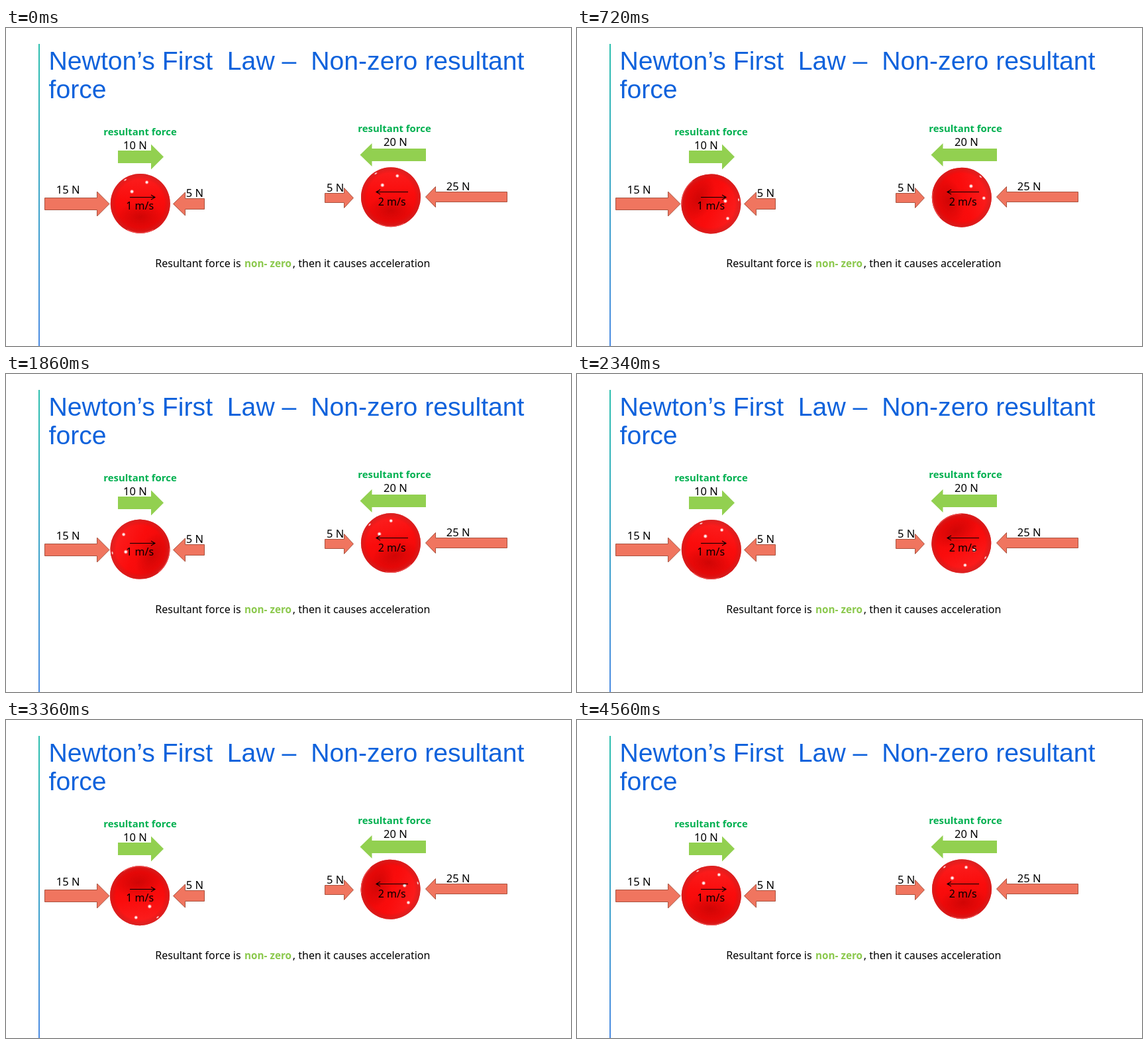
These frames come from a looping animation (853x480 px, 4.62 s). An HTML page:

```html
<!DOCTYPE html>
<html lang="en">
<head>
<meta charset="utf-8">
<title>Non-zero resultant force</title>
<style>
  html, body { margin: 0; width: 100%; height: 100%; overflow: hidden; background: #fff; }
  svg { display: block; }
  text { font: 16px "Noto Sans", sans-serif; white-space: pre; }
  .title { font: 39.2px "Liberation Sans", Arial, sans-serif; fill: #0f62dc; }
  .bold { font-size: 14.9px; font-weight: 700; fill: #00b050; }
  .newtons { font-size: 16.5px; }
  .force { fill: #f0755f; stroke: #a9523f; }
  .resultant { fill: #92d050; }
  .velocity { fill: none; stroke: #000; stroke-width: 1.1; }
</style>
</head>
<body>
<svg width="853" height="480" viewBox="0 0 853 480">
  <defs>
    <linearGradient id="bar" x1="0" y1="0" x2="0" y2="1">
      <stop offset="0" stop-color="#2cbfae"/>
      <stop offset="1" stop-color="#4a8ae2"/>
    </linearGradient>
    <linearGradient id="red" x1="0" y1="0" x2="0" y2="1">
      <stop offset="0" stop-color="#fb2020"/>
      <stop offset=".45" stop-color="#fa0c0c"/>
      <stop offset="1" stop-color="#ea0808"/>
    </linearGradient>
    <radialGradient id="rim">
      <stop offset=".8" stop-color="#c81818" stop-opacity="0"/>
      <stop offset="1" stop-color="#cc2424" stop-opacity=".75"/>
    </radialGradient>
    <radialGradient id="shade">
      <stop offset="0" stop-color="#b00000" stop-opacity=".5"/>
      <stop offset="1" stop-color="#b00000" stop-opacity="0"/>
    </radialGradient>
    <radialGradient id="shine">
      <stop offset="0" stop-color="#fff"/>
      <stop offset=".4" stop-color="#fff" stop-opacity=".9"/>
      <stop offset="1" stop-color="#ff8080" stop-opacity="0"/>
    </radialGradient>
    <g id="ball">
      <circle r="45" fill="url(#red)"/>
      <ellipse cy="20" rx="36" ry="22" fill="url(#shade)"/>
      <circle r="45" fill="url(#rim)"/>
      <path d="M-20 39.5A44.3 44.3 0 0 0 20 39.5" fill="none" stroke="#ff7070" stroke-opacity=".6" stroke-width="1.2"/>
      <circle cx="-12.7" cy="-18" r="3.6" fill="url(#shine)"/>
      <circle cx="9.8" cy="-32" r="3.3" fill="url(#shine)"/>
      <ellipse rx="1.6" ry="3.2" transform="translate(-22.7 -35.6) rotate(58)" fill="url(#shine)" opacity=".8"/>
    </g>
  </defs>

  <rect x="49" y="24" width="2" height="456" fill="url(#bar)"/>
  <text class="title" x="64.5" y="63">Newton’s First&#160; Law –&#160; Non-zero resultant</text>
  <text class="title" x="64.5" y="106">force</text>

  <use href="#ball" id="left"/>
  <use href="#ball" id="right"/>
  <g id="arrows"></g>
  <path class="velocity" d="M187 255.5H225M219 252L225 255.5L219 259"/>
  <path class="velocity" d="M607 247.5H559M565 244L559 247.5L565 251"/>

  <text class="bold" x="147.3" y="162">resultant force</text>
  <text class="bold" x="531.3" y="157">resultant force</text>
  <g id="labels"></g>
  <text x="181.3" y="273.5">1 m/s</text>
  <text x="561.8" y="268">2 m/s</text>
  <text x="225.3" y="361">Resultant force is</text>
  <text class="bold" x="360" y="361" style="font-size:15.3px;fill:#8cc94e">non- zero</text>
  <text x="432.8" y="361">, then it causes acceleration</text>
</svg>
<script>
  const byId = id => document.getElementById(id);

  // Block arrow from tail to tip; half and wing are half-heights of shaft and head.
  const arrow = (kind, tail, neck, tip, y, half, wing) =>
    `<path class="${kind}" d="M${tail} ${y - half}H${neck}V${y - wing}L${tip} ${y}L${neck} ${y + wing}V${y + half}H${tail}Z"/>`;

  byId("arrows").innerHTML =
    arrow("resultant", 169, 219, 238, 194.5, 9.5, 19) +
    arrow("resultant", 634, 552.5, 534.5, 191.5, 9.5, 17.5) +
    arrow("force", 58.5, 137.5, 156, 265.5, 9, 18.5) +
    arrow("force", 299.5, 270.5, 252.5, 265.5, 8, 17.5) +
    arrow("force", 481.5, 510.5, 524.5, 256.5, 7, 15) +
    arrow("force", 756.5, 648.5, 633.5, 255, 7.5, 15.5);

  byId("labels").innerHTML = [
    ["10 N", 177, 183], ["15 N", 75.8, 250], ["5 N", 271.7, 255],
    ["20 N", 570, 178], ["5 N", 484, 247], ["25 N", 664.8, 245]
  ].map(([text, x, y]) => `<text class="newtons" x="${x}" y="${y}">${text}</text>`).join("");

  const LOOP = 4620, STEP = 60;
  const spin = (id, x, y, angle) =>
    byId(id).setAttribute("transform", `translate(${x} ${y}) rotate(${angle}) translate(.4 -.1)`);

  function draw(now) {
    const t = Math.floor(now % LOOP / STEP) * STEP;
    spin("left", 202.4, 265, t * 0.1586);
    spin("right", 580.6, 255.3, t * -0.396);
    requestAnimationFrame(draw);
  }
  draw(performance.now());
</script>
</body>
</html>
```
